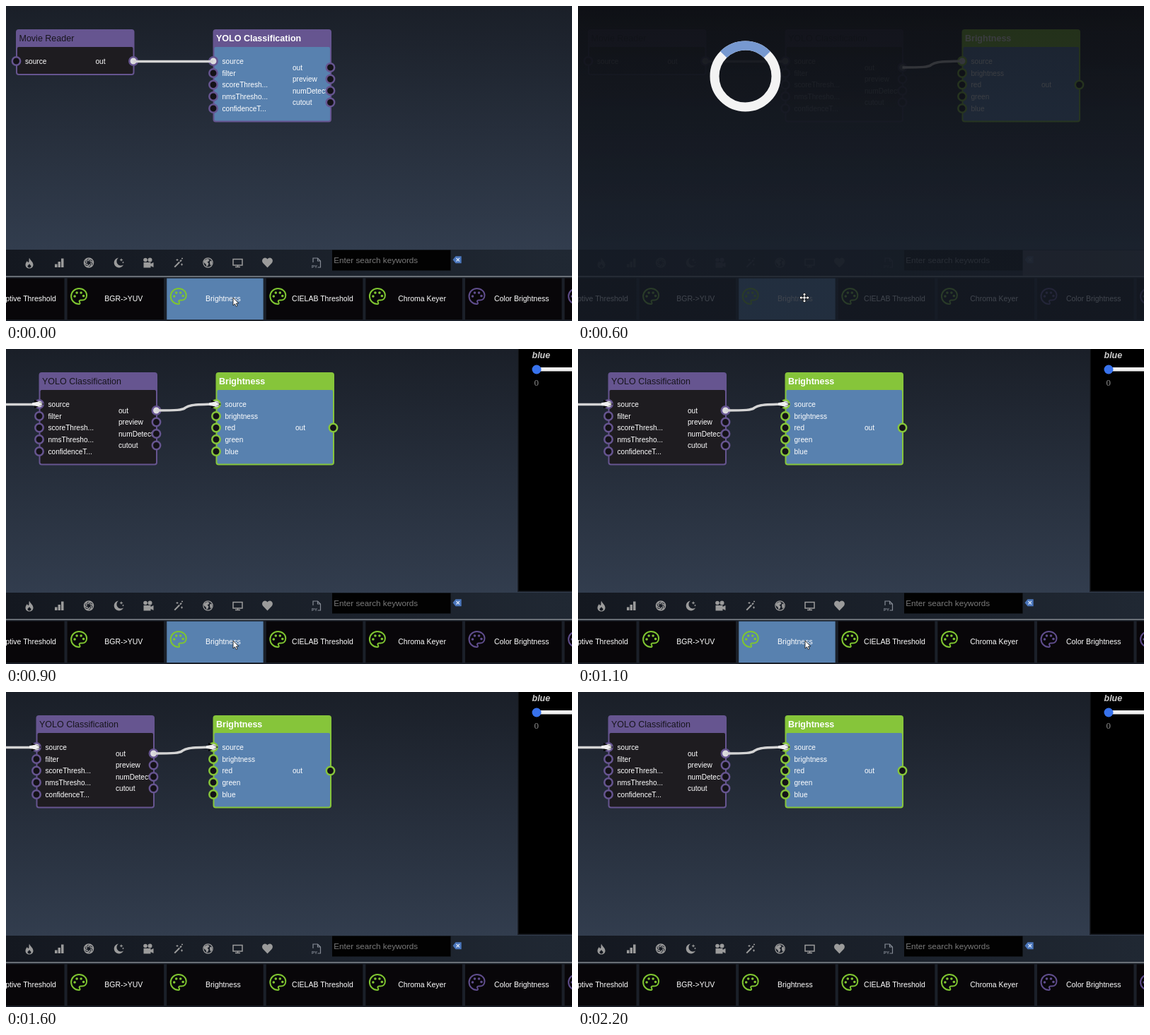
Recreate the animation shown at these times as an HTML page. Size 800x446 px, loop 2.3 s.

```html
<!DOCTYPE html>
<html lang="en">
<head>
<meta charset="utf-8">
<title>Node editor</title>
<style>
  html, body { margin: 0; width: 100%; height: 100%; overflow: hidden; background: #1b2029; }
  #stage { display: block; width: 800px; height: 446px; font-family: "Liberation Sans", Arial, sans-serif; }
  .title { font-size: 12.5px; }
  .label { font-size: 10.1px; fill: #fff; }
  .tile { font-size: 10.5px; fill: #fff; text-anchor: middle; }

  .before, .after, .loading, .loaded, .panel, .hover, .arrow, .move, .dim, .pan {
    animation: 2300ms step-end infinite;
  }
  .before  { animation-name: before; }
  .after   { animation-name: after; }
  .loading { animation-name: loading; }
  .loaded  { animation-name: loaded; }
  .panel   { animation-name: panel; }
  .hover   { animation-name: hover; }
  .arrow   { animation-name: arrow; }
  .move    { animation-name: move; }
  .dim     { animation-name: dim; }
  .pan     { animation-name: pan; }

  @keyframes before  { 0% { visibility: visible } 26.08%, 100% { visibility: hidden } }
  @keyframes after   { 0% { visibility: hidden } 26.08%, 100% { visibility: visible } }
  @keyframes loading { 0% { visibility: hidden } 26.08% { visibility: visible } 30.43%, 100% { visibility: hidden } }
  @keyframes loaded  { 0% { visibility: hidden } 30.43%, 100% { visibility: visible } }
  @keyframes panel   { 0% { visibility: hidden } 34.78%, 100% { visibility: visible } }
  @keyframes hover   { 0% { visibility: visible } 56.52%, 100% { visibility: hidden } }
  @keyframes arrow   { 0% { visibility: visible } 26.08% { visibility: hidden } 34.78% { visibility: visible } 56.52%, 100% { visibility: hidden } }
  @keyframes move    { 0% { visibility: hidden } 26.08% { visibility: visible } 34.78%, 100% { visibility: hidden } }
  @keyframes dim     { 0% { opacity: 1 } 26.08% { opacity: .25 } 30.43%, 100% { opacity: 1 } }
  @keyframes pan {
    0%     { transform: none }
    30.43% { transform: translate(-153.7px, .7px) scale(.992) }
    34.78% { transform: translate(-226px, .3px) scale(.997) }
    39.13% { transform: translate(-246px, 0) }
    43.47%, 100% { transform: translate(-250px, 0) }
  }
</style>
</head>
<body>
<svg id="stage" viewBox="0 0 800 446">
  <defs>
    <linearGradient id="sky" x2="0" y2="1">
      <stop stop-color="#1a1f28"/><stop offset="1" stop-color="#323d4e"/>
    </linearGradient>
    <linearGradient id="bar">
      <stop stop-color="#141820"/><stop offset="1" stop-color="#202833"/>
    </linearGradient>
    <linearGradient id="shade" x2="0" y2="1">
      <stop stop-color="#0d0e12"/><stop offset=".75" stop-color="#161c26"/>
    </linearGradient>
    <g id="palette" fill="none" stroke="currentColor" stroke-width="2">
      <path d="M0 11A11 11 0 1 1 0-11C6.500-11 11-6.500 11-1.500C11 3 8 5.500 4.500 5.500H2.500C.5 5.500 0 7 1 8.500C2 10 1.300 11 0 11Z"/>
      <g fill="currentColor" stroke="none">
        <circle cx="-6" cy="0" r="1.800"/><circle cx="-3" cy="-5" r="1.800"/>
        <circle cx="3" cy="-5" r="1.800"/><circle cx="6.500" cy="-.5" r="1.800"/>
      </g>
    </g>
    <g id="tip">
      <path d="M-7-6L7 0L-7 6Z" fill="#060606"/>
      <path d="M-10-1.700L-1-3.600L5 0L-1 3.600L-10 1.700Z" fill="#eee"/>
    </g>
  </defs>

  <rect width="800" height="346" fill="url(#sky)"/>

  <g id="first" class="before"></g>
  <g class="after"><g id="second" class="pan"></g></g>

  <g class="panel">
    <rect x="723" width="77" height="344" fill="#1a1e25"/>
    <rect x="724.500" width="76" height="342.500" fill="#000"/>
    <text x="743.500" y="13" class="title" font-weight="bold" font-style="italic" fill="#ccc">blue</text>
    <rect x="750" y="26" width="50" height="5.500" fill="#f0f0f0"/>
    <circle cx="750" cy="29" r="6.500" fill="#3872ec"/>
    <text x="746.500" y="52" font-size="13" font-family="Liberation Serif, serif" fill="#8c8c8c">0</text>
  </g>

  <rect y="345" width="800" height="38" fill="url(#bar)"/>
  <rect y="383" width="800" height="63" fill="#1b2029"/>
  <rect y="382.300" width="800" height="1.400" fill="#8b9097"/>

  <g class="dim" fill="#9b9b9b" stroke="#9b9b9b" stroke-width="0">
    <path transform="translate(33 364)" d="M0-7.500C1-4 5.500-2 5.500 2.500C5.500 5.500 3 7.500 0 7.500S-5.500 5.500-5.500 2.500C-5.500 0-4-2-3-3C-2.500-1.500-2-1-1-1C0-3-1-5 0-7.500ZM0 1C-1 3-2.500 3-2.500 4.500S-1 6.500 0 6.500S2.500 6 2.500 4.500S1 3 0 1Z" fill-rule="evenodd"/>
    <path d="M69 365.500h3.500v4.500h-3.500zM73.500 362h3.500v8h-3.500zM78 357.500h3.500v12.500h-3.500z"/>
    <g id="aperture" transform="translate(117 363.500)" fill="none" stroke-width="1.500"><circle r="6.500"/></g>
    <path d="M159 356.500A7 7 0 1 0 166 366.500A6 6 0 0 1 159 356.500ZM163 357l.7 1.800 1.800.7-1.800.7-.7 1.800-.7-1.800-1.800-.7 1.800-.7zM165.500 361.500l.5 1 1 .5-1 .5-.5 1-.5-1-1-.5 1-.5z"/>
    <g>
      <circle cx="197" cy="359.500" r="2.800"/><circle cx="203.500" cy="359.500" r="3"/>
      <path d="M194.500 363h10v2l4-2v7l-4-2v2.500h-10z"/>
    </g>
    <path d="M237.500 369L244.500 361.800L246 363.300L239 370.300ZM245.300 361L247.300 359L248.700 360.400L246.700 362.400Z"/>
    <path d="M242 358v3M240.500 359.500h3M248.500 364.500v3M247 366h3M249 356.500v2M248 357.500h2" stroke-width="1"/>
    <g transform="translate(285.500 363.500)">
      <circle r="6.600" fill="none" stroke-width="1.300"/>
      <path d="M-5.500-3L-1-5.500L2-4.500L1-2L-1-1L1 1L0 4L-2 5.500L-3 2L-5.500 0ZM3-3L5.500-2L6 2L3.500 4L2.500 0Z"/>
    </g>
    <path d="M321 358.500h13v8.500h-13zM327.500 367v2.500M324 369.500h7" fill="none" stroke-width="1.500"/>
    <path d="M369.500 370.500L363.300 364C360.500 360.500 363 356.500 366 356.500C368 356.500 369 357.500 369.500 358.500C370 357.500 371 356.500 373 356.500C376 356.500 378.500 360.500 375.700 364Z"/>
    <g stroke="#858b95">
      <path d="M434 363V357h6.500l4 4v9h-4M440.500 357v4h4" fill="none" stroke-width="1.200"/>
      <text x="432" y="371" font-size="6" font-weight="bold" fill="#858b95">PY</text>
    </g>
    <path d="M631.500 359.300L635.500 354.300H643.700V364.300H635.500Z" fill="#4b77bd"/>
    <path d="M636.500 357l4.500 4.500M641 357l-4.500 4.500" stroke="#dce6f5" stroke-width="1.200"/>
  </g>
  <rect x="461" y="345.500" width="167.500" height="29" fill="#020202"/>
  <text x="463.300" y="364" font-size="11.700" fill="#7a7a7a">Enter search keywords</text>

  <g id="tiles"></g>

  <g class="loading">
    <rect width="800" height="446" fill="url(#shade)" opacity=".82"/>
    <rect x="628.500" y="346" width="172" height="36" fill="#fff" opacity=".025"/>
    <g fill="none" stroke-width="13">
      <circle cx="236.500" cy="99.500" r="43.500" stroke="#f3f3f3"/>
      <path d="M205.740 68.740A43.500 43.500 0 0 1 267.260 68.740" stroke="#7799d0"/>
    </g>
  </g>

  <path class="arrow" d="M321 413v11l2.500-2.300 1.800 3.800 1.800-.9-1.700-3.600h3.400z" fill="#fff" stroke="#111" stroke-width=".8"/>
  <path class="move" transform="translate(320 413)" fill="#fff" stroke="#111" stroke-width=".8"
    d="M0-7L3-4H1V-1H4V-3L7 0L4 3V1H1V4H3L0 7L-3 4H-1V1H-4V3L-7 0L-4-3V-1H-1V-4H-3Z"/>
</svg>

<script>
  const PURPLE = "#665590", GREEN = "#86c53a", WIRE = "#d4d4d4";
  const $ = id => document.getElementById(id);

  const port = (x, y, color, linked) =>
    `<circle cx="${x}" cy="${y}" r="5.700" fill="${linked ? "#dcdce0" : "#141217"}" stroke="${color}" stroke-width="2.500"/>`;

  // Ports are [label, y, linked], with y measured on the stage.
  function node({ x, height, title, color = PURPLE, selected, inputs, outputs }) {
    const label = (left, [text, y]) => `<text class="label" x="${left}" y="${y - 29.5}">${text}</text>`;
    const ports = (list, left) => list.map(([, y, linked]) => port(left, y - 33, color, linked)).join("");
    return `<g transform="translate(${x} 33)">
      <rect width="167.500" height="${height}" rx="4" fill="${color}"/>
      <rect x="2" y="25" width="163.500" height="${height - 27}" rx="2" fill="${selected ? "#5881af" : "#1e1c20"}"/>
      <text class="title" x="4.500" y="17" ${selected ? 'font-weight="bold" fill="#fff"' : 'fill="#17151c"'}>${title}</text>
      <svg width="160" height="${height}">
        ${inputs.map(p => label(13, p)).join("")}${outputs.map(p => label(112.5, p)).join("")}
      </svg>
      ${ports(inputs, 0.5)}${ports(outputs, 166)}
    </g>`;
  }

  const wire = d => `<path d="${d}" fill="none" stroke="${WIRE}" stroke-width="3.500"/>`;
  const tip = (x, y) => `<use href="#tip" class="loaded" x="${x}" y="${y}"/>`;

  const reader = node({
    x: 14, height: 65, title: "Movie Reader",
    inputs: [["source", 78]], outputs: [["out", 78, true]]
  });
  const yolo = selected => node({
    x: 292.5, height: 131.5, title: "YOLO Classification", selected,
    inputs: [["source", 78, true], ["filter", 95], ["scoreThresh...", 111.5], ["nmsThresho...", 128], ["confidenceT...", 145]],
    outputs: [["out", 87, !selected], ["preview", 103.5], ["numDetections", 120], ["cutout", 136.5]]
  });
  const brightness = node({
    x: 542.5, height: 131.5, title: "Brightness", color: GREEN, selected: true,
    inputs: [["source", 78, true], ["brightness", 95], ["red", 111.5], ["green", 128], ["blue", 145]],
    outputs: [["out", 111.5]]
  });
  const feed = wire("M180 78.500H293");

  $("first").innerHTML = reader + yolo(true) + feed;
  $("second").innerHTML =
    `<g class="dim">${reader}${yolo(false)}${feed}</g>` + brightness +
    wire("M458.500 87C488 87 495 86.500 499 83.500S504 78.500 543 78") +
    tip(293, 78) + tip(543, 78);

  $("aperture").innerHTML += Array.from({ length: 6 }, (_, i) =>
    `<path transform="rotate(${i * 60})" d="M1-2.500Q5-3 6 1"/>`).join("");

  const names = ["Adaptive Threshold", "BGR-&gt;YUV", "Brightness", "CIELAB Threshold", "Chroma Keyer", "Color Brightness", ""];
  $("tiles").innerHTML = names.map((name, i) => {
    const x = -54 + i * 140.6;
    const box = (fill, extra = "") => `<rect ${extra} x="${x}" y="385.500" width="136.500" height="58.500" fill="${fill}"/>`;
    return box("#080609") + (i === 2 ? box("#5881af", 'class="hover"') : "") +
      `<use href="#palette" x="${x + 16.5}" y="411" color="${i > 4 ? "#5f4d8c" : "#7fc531"}"/>
       <text class="tile" x="${x + 79.7}" y="417.500">${name}</text>`;
  }).join("");
</script>
</body>
</html>
```
